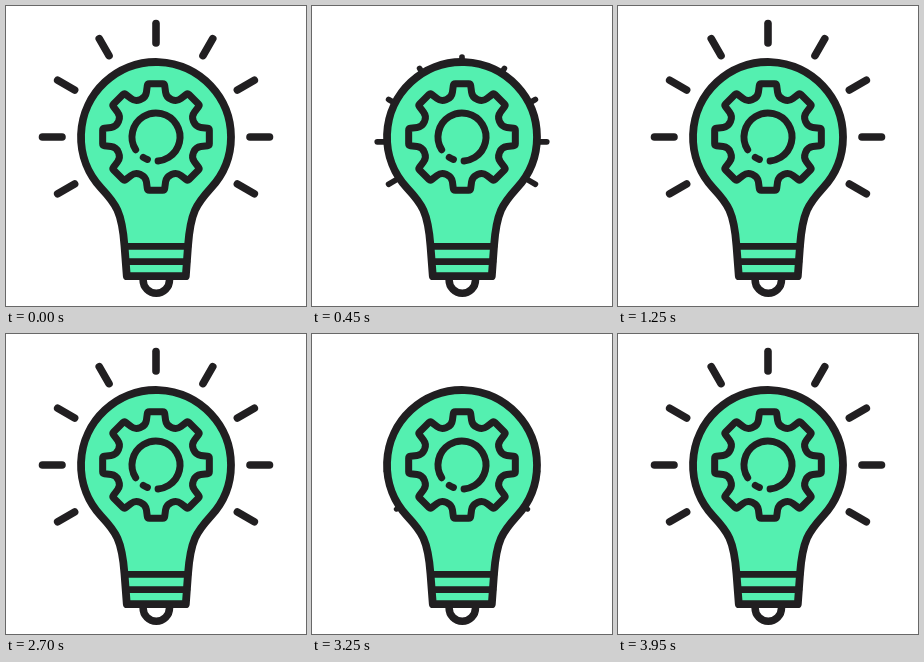
These frames come from a looping animation (300 px wide and 300 px high, 5.35 s). An HTML page with a canvas:

```html
<!DOCTYPE html>
<html>
<head>
<meta charset="utf-8">
<style>
html, body { margin: 0; width: 100%; height: 100%; overflow: hidden; background: #fff; }
canvas { display: block; width: 300px; height: 300px; }
</style>
</head>
<body>
<canvas id="stage"></canvas>
<script>
const LOOP = 5350, INK = '#211f21', GREEN = '#54f0b0';
const CX = 150, CY = 131;
const canvas = document.getElementById('stage');
const ctx = canvas.getContext('2d');
const dpr = window.devicePixelRatio || 1;
canvas.width = canvas.height = 300 * dpr;

const rad = deg => deg * Math.PI / 180;
const polar = (r, deg) => [CX + r * Math.cos(rad(deg)), CY + r * Math.sin(rad(deg))];

function line(x1, y1, x2, y2) {
  ctx.beginPath();
  ctx.moveTo(x1, y1);
  ctx.lineTo(x2, y2);
  ctx.stroke();
}

function arc(r, from, to) {
  ctx.beginPath();
  ctx.arc(CX, CY, r, rad(from), rad(to));
  ctx.stroke();
}

// Rays shrink towards the stage centre and come back, twice per loop.
function rayScale(t) {
  const pulse = mid => {
    const u = Math.abs(t - mid) / 550;
    return u < 1 ? Math.cos(u * Math.PI / 2) ** 1.5 : 0;
  };
  return 1 - 0.38 * (pulse(697) + pulse(3397));
}

function drawRays(scale) {
  ctx.save();
  ctx.translate(150, 150);
  ctx.scale(scale, scale);
  ctx.translate(-150, -150);
  ctx.lineWidth = 7.6;
  for (let a = 150; a <= 390; a += 30) line(...polar(94, a), ...polar(113.5, a));
  ctx.restore();
}

function drawBulb() {
  ctx.lineWidth = 7.5;
  ctx.beginPath();
  ctx.arc(150.3, 274, 13.2, 0, Math.PI);
  ctx.stroke();

  ctx.lineWidth = 7.8;
  ctx.beginPath();
  ctx.arc(CX, CY, 75, rad(137), rad(403));
  ctx.bezierCurveTo(190.5, 198, 184.5, 206, 182, 240);
  ctx.lineTo(179.8, 270.2);
  ctx.lineTo(120.8, 270.2);
  ctx.lineTo(118.5, 240);
  ctx.bezierCurveTo(116, 206, 110, 198, ...polar(75, 137));
  ctx.closePath();
  ctx.fillStyle = GREEN;
  ctx.fill();
  ctx.stroke();

  ctx.lineWidth = 6.8;
  line(118.5, 240.3, 182, 240.3);
  line(119.7, 255.6, 180.9, 255.6);
}

function drawGear() {
  const pts = [];
  for (let a = 0; a < 360; a += 45) {
    pts.push([41, a - 14.5], [54, a - 9], [54, a + 9], [41, a + 14.5]);
  }
  const xy = pts.map(p => polar(...p));
  const n = xy.length, last = xy[n - 1];
  ctx.lineWidth = 7;
  ctx.beginPath();
  ctx.moveTo((last[0] + xy[0][0]) / 2, (last[1] + xy[0][1]) / 2);
  xy.forEach((p, i) => {
    const root = pts[i][0] < 50;
    ctx.arcTo(...p, ...xy[(i + 1) % n], root ? 9 : 2);
  });
  ctx.closePath();
  ctx.stroke();

  arc(24, 148, 445);
  arc(24, 111, 122);
}

function frame(now) {
  const t = now % LOOP;
  ctx.setTransform(dpr, 0, 0, dpr, 0, 0);
  ctx.fillStyle = '#fff';
  ctx.fillRect(0, 0, 300, 300);
  ctx.strokeStyle = INK;
  ctx.lineCap = ctx.lineJoin = 'round';
  drawRays(rayScale(t));
  drawBulb();
  drawGear();
}

const start = performance.now();
function tick() {
  frame(performance.now() - start);
  requestAnimationFrame(tick);
}
tick();
</script>
</body>
</html>
```
